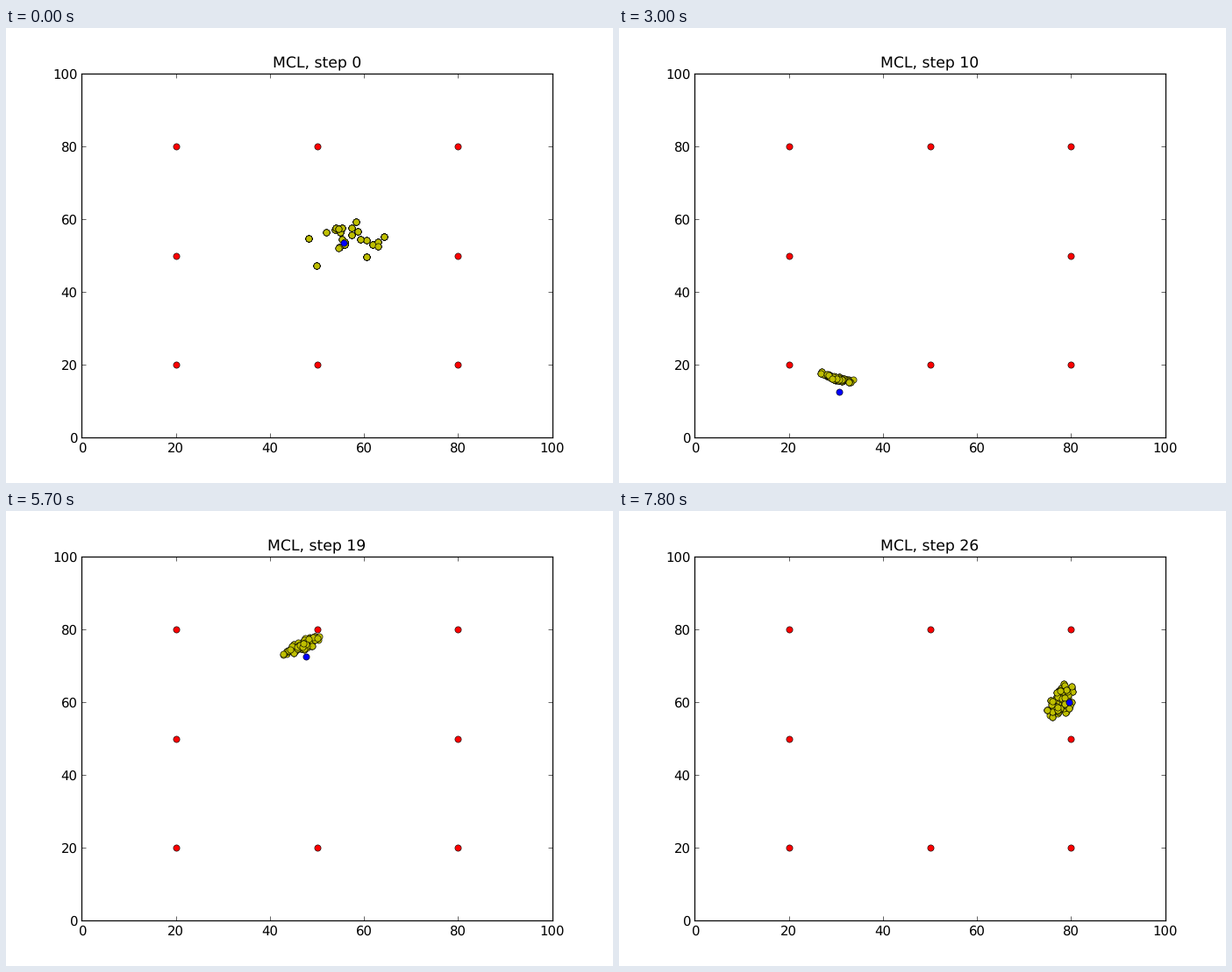
A matplotlib script for the animation above (8000 ms loop, 692 by 519 pixels).

```python
import numpy as np
import matplotlib.pyplot as plt
from matplotlib.animation import FuncAnimation

plt.rcParams.update({
    "font.family": "DejaVu Sans", "font.size": 12.4, "text.hinting": "none",
    "axes.linewidth": 1.0, "axes.titlesize": 14.4, "axes.titlepad": 5,
    "lines.markersize": 6, "lines.markeredgewidth": 0.5,
    "savefig.dpi": "figure",
})

STAGE_W, STAGE_H, DPI = 692, 519, 86.5
WORLD = 100
TICK_MS, TICKS_PER_STEP, TICKS = 100, 3, 80
SPEED, TURN = 5, 0.1
START, HEADING = np.array([55.75, 53.4]), 3.712

# Drift of the estimate away from the robot, at a few key steps.
DRIFT_STEPS = [0, 6, 10, 19, 26]
DRIFT_X = [1.0, -3.4, -0.6, -0.9, -1.75]
DRIFT_Y = [0.6, 5.2, 3.7, 3.1, 0.1]


def rotate(x, y, angle):
    c, s = np.cos(angle), np.sin(angle)
    return np.column_stack([x * c - y * s, x * s + y * c])


def robot(step):
    """Position after a number of equal moves, each turned a little further."""
    chord = SPEED * np.sin(TURN * step / 2) / np.sin(TURN / 2)
    angle = HEADING + TURN * (step - 1) / 2
    return START + chord * np.array([np.cos(angle), np.sin(angle)])


def particles(step):
    """Resampled cloud: wide at first, then a thin bow that turns and thickens."""
    rng = np.random.default_rng(40 + step)
    survivors = min(24 + 30 * step, 110)
    u, v = np.clip(rng.normal(0, 0.45, (2, survivors)), -1, 1)

    initial = 8 * np.exp(-step)
    length = initial + 5 * (1 - np.exp(-step / 8))
    width = initial + 0.3 + 0.0028 * step ** 2
    spread = rotate(length * u, width * v + 0.4 * u ** 2, TURN * (step - 13.5))

    drift = [np.interp(step, DRIFT_STEPS, d) for d in (DRIFT_X, DRIFT_Y)]
    return robot(step) + drift + spread[rng.integers(0, survivors, 200)]


fig = plt.figure(figsize=(STAGE_W / DPI, STAGE_H / DPI), dpi=DPI,
                 facecolor="white")
ax = fig.add_axes([86.4 / STAGE_W, 0.1, 536.2 / STAGE_W, 0.8])
ax.set(xlim=(0, WORLD), ylim=(0, WORLD))
ax.set_xticks(range(0, WORLD + 1, 20))
ax.set_yticks(range(0, WORLD + 1, 20))
ax.tick_params(direction="in", top=True, right=True, length=4, width=0.5, pad=4)
title = ax.set_title("", y=1.0)


def dots(color):
    return ax.plot([], [], "o", color=color, markeredgecolor="black")[0]


cloud, landmarks, pose = dots("#bfbf00"), dots("#ff0000"), dots("#0000ff")
grid = [(x, y) for x in (20, 50, 80) for y in (20, 50, 80) if (x, y) != (50, 50)]
landmarks.set_data(*zip(*grid))


def update(tick):
    step = tick // TICKS_PER_STEP
    cloud.set_data(*(particles(step) % WORLD).T)
    x, y = robot(step) % WORLD
    pose.set_data([x], [y])
    title.set_text(f"MCL, step {step}")
    return cloud, pose, title


anim = FuncAnimation(fig, update, frames=TICKS, interval=TICK_MS,
                     repeat=True, repeat_delay=0, blit=False)
plt.show()
```
